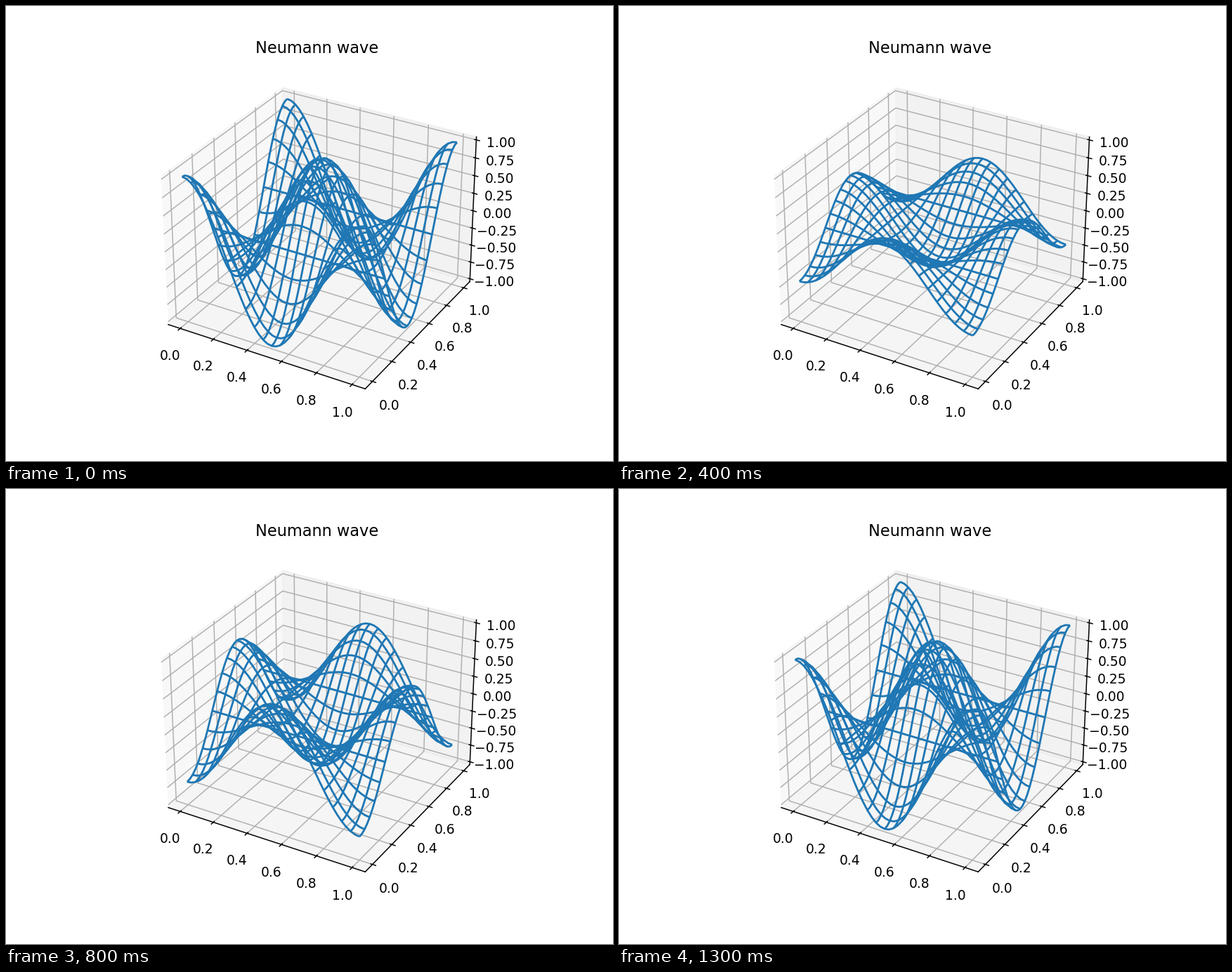
Write a matplotlib script that moves like this. It is 864x648 px and loops after 1400 ms.

```python
import numpy as np
import matplotlib.pyplot as plt
from matplotlib.animation import FuncAnimation

N = 40              # grid cells per side; one period also takes 40 time steps
FRAMES = 14
MARGIN = 1 / 48     # padding of the box around the axis limits

xs = np.linspace(0, 1, N + 1)
X, Y = np.meshgrid(xs, xs, indexing="ij")
mode = np.cos(2 * np.pi * X) * np.cos(2 * np.pi * Y)


def padded(low, high):
    pad = (high - low) * MARGIN
    return low - pad, high + pad


fig = plt.figure(figsize=(6.4, 4.8), dpi=135)
ax = fig.add_subplot(projection="3d")
ax.set_title("Neumann wave")
ax.set_xlim(*padded(-0.05, 1.05))
ax.set_ylim(*padded(-0.05, 1.05))
ax.set_zlim(*padded(-1, 1))
ax.set_xticks(np.linspace(0, 1, 6))
ax.set_yticks(np.linspace(0, 1, 6))
ax.set_zticks(np.linspace(-1, 1, 9))
ax.set_autoscale_on(False)

wire = None


def draw(frame):
    """Show the initial state, then every third step starting at step 4."""
    global wire
    if wire is not None:
        wire.remove()
    step = 3 * frame + 1 if frame else 0
    height = mode * np.cos(2 * np.pi * step / N)
    wire = ax.plot_wireframe(X, Y, height, rstride=2, cstride=2, color="C0")
    return [wire]


anim = FuncAnimation(fig, draw, frames=FRAMES, interval=100,
                     init_func=lambda: draw(0), repeat=True, repeat_delay=0)
plt.show()
```
